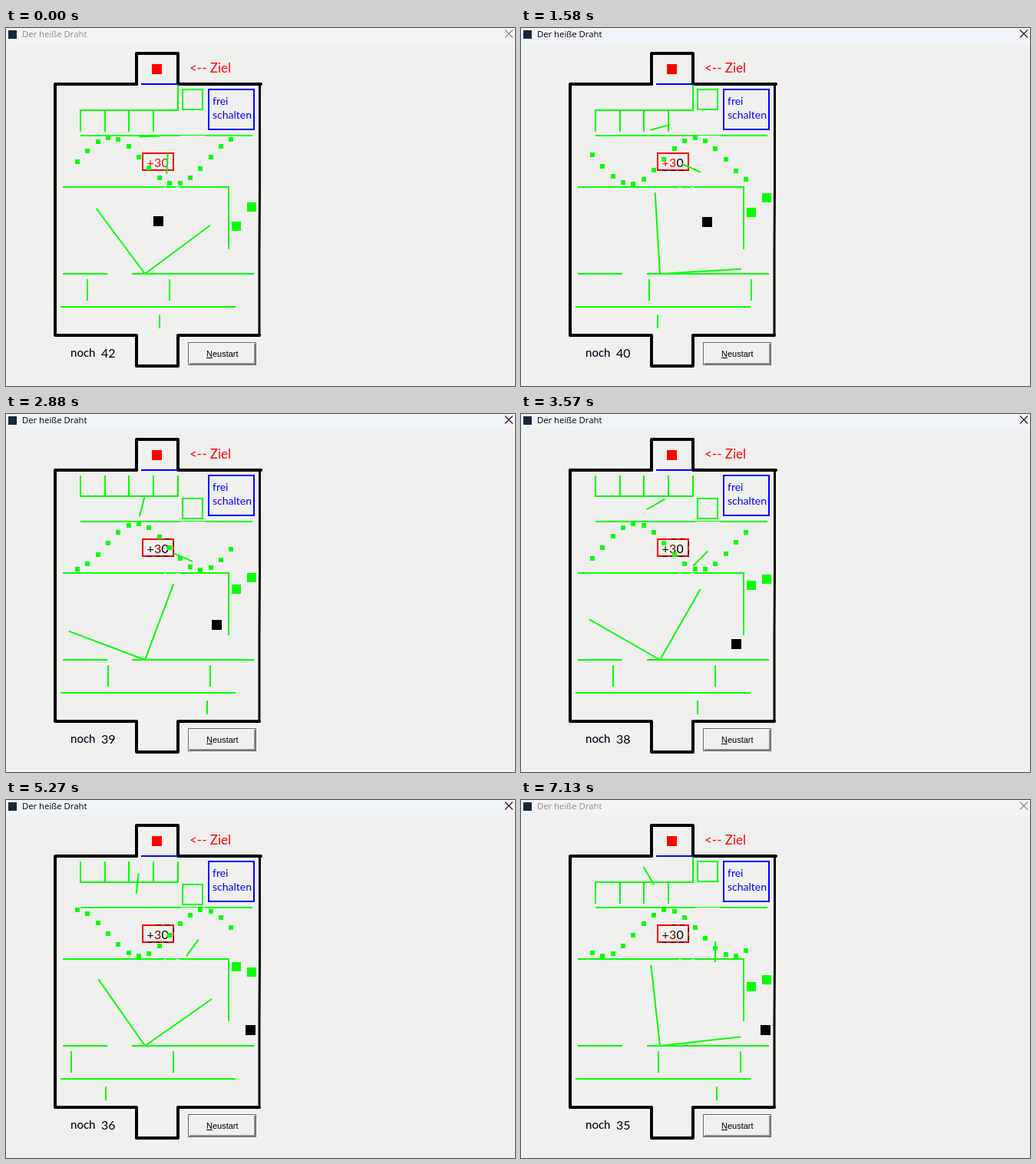
Animation of 663x466 px, one loop 7.18 s. Source, as an HTML page with a canvas:

```html
<!DOCTYPE html>
<html lang="de">
<head>
<meta charset="utf-8">
<title>Der heiße Draht</title>
<style>
  html, body { margin: 0; width: 100%; height: 100%; overflow: hidden; background: #f0f0ee; }
  canvas { display: block; width: 663px; height: 466px; }
</style>
</head>
<body>
<canvas id="stage" width="663" height="466"></canvas>
<script>
const ctx = document.getElementById('stage').getContext('2d');
const LOOP = 7180, STEPS = 105, STEP = LOOP / STEPS;
const GREEN = '#00ff00', RED = '#ff0000', BLUE = '#0000ff', BLACK = '#000000';
const HAND = 'Lato, "Open Sans", sans-serif';

// [screen refresh, game ticks]: the game clock runs unevenly
const TICKS = [[0, 0], [13, 16], [33, 42], [52, 58], [64, 67], [89, 92], [104, 105]];
// [screen refresh, x, y] of the player
const PATH = [[0, 198, 251], [5, 198, 251], [13, 216.5, 251], [33, 268.5, 253],
              [52, 280.5, 299], [64, 302.5, 299], [73, 318.5, 299]];

const mod = (v, m) => ((v % m) + m) % m;

function lerpKeys(keys, f, col) {
  for (let i = 1; i < keys.length; i++) {
    const a = keys[i - 1], b = keys[i];
    if (f <= b[0]) return a[col] + (b[col] - a[col]) * (f - a[0]) / (b[0] - a[0]);
  }
  return keys[keys.length - 1][col];
}

function line(color, width, ...pts) {
  ctx.strokeStyle = color;
  ctx.lineWidth = width;
  ctx.beginPath();
  for (let i = 0; i < pts.length; i += 2) ctx.lineTo(pts[i], pts[i + 1]);
  ctx.stroke();
}

function square(color, x, y, size) {
  ctx.fillStyle = color;
  ctx.fillRect(Math.round(x - size / 2), Math.round(y - size / 2), size, size);
}

function frame(color, x, y, w, h) {
  ctx.strokeStyle = color;
  ctx.lineWidth = 2;
  ctx.strokeRect(x, y, w, h);
}

function text(str, x, y, color, font) {
  ctx.fillStyle = color;
  ctx.font = font;
  ctx.fillText(str, x, y);
}

function stick(x, y, angle) {
  const dx = 13.5 * Math.cos(angle), dy = 13.5 * Math.sin(angle);
  line(GREEN, 2, x - dx, y + dy, x + dx, y - dy);
}

function titleBar(active) {
  ctx.fillStyle = active ? '#f0f3f8' : '#f3f3f3';
  ctx.fillRect(0, 0, 663, 20);
  square('#182838', 8, 8, 11);
  text('Der heiße Draht', 21, 12, active ? '#000' : '#8c8c8c', '11.3px "Open Sans", "Noto Sans", sans-serif');
  const x = active ? '#3a1820' : '#8c8c8c';
  line(x, 1.2, 650, 2.5, 660, 12.5);
  line(x, 1.2, 660, 2.5, 650, 12.5);
}

function walls() {
  ctx.lineJoin = 'round';
  ctx.lineCap = 'round';
  line(BLACK, 4, 170, 73, 64, 73, 64, 400, 170, 400, 170, 440, 224, 440, 224, 400, 330, 400);
  line(BLACK, 4, 170, 73, 170, 33, 224, 33, 224, 73, 332, 73);
  line(BLACK, 3, 330.5, 73, 330.5, 205, 330, 290, 330, 400);
  ctx.lineCap = 'butt';
  ctx.lineJoin = 'miter';
  line(BLUE, 2, 176, 73, 224, 73);
  square(RED, 196.5, 53.5, 13);
  text('<-- Ziel', 239, 58, RED, '17px ' + HAND);
  frame(BLUE, 264, 80, 59, 52);
  text('frei', 269, 100, BLUE, '14px ' + HAND);
  text('schalten', 269, 118, BLUE, '14px ' + HAND);
}

function fixedWires() {
  line(GREEN, 2, 97, 140, 227, 140);
  line(GREEN, 1, 227, 139.5, 260, 139.5);
  line(GREEN, 2, 260, 140, 321, 140);
  line(GREEN, 2, 74, 207, 291, 207, 291, 207);
  line('#f0f0ee', 1, 206, 207.5, 208, 207.5);
  line('#f0f0ee', 1, 221, 207.5, 226, 207.5);
  line(GREEN, 2, 290, 206, 290, 288);
  line(GREEN, 2, 74, 320, 132, 320);
  line(GREEN, 2, 164, 320, 323, 320);
  line(GREEN, 2, 71, 363, 299, 363);
}

function comb(up) {
  line(GREEN, 2, 96, 107, 225, 107);
  for (const x of [97, 129, 160, 192]) line(GREEN, 2, x, 107, x, up ? 80 : 135);
  line(GREEN, 2, 224, up ? 80 : 74, 224, 107);
  frame(GREEN, 230, up ? 110 : 80, 26, 26);
}

// The bonus loses its red where wires have swept over it
function bonus(f) {
  frame(RED, 178, 163, 40, 22);
  if (f >= 8) {
    ctx.setLineDash([6, 5]);
    line(BLACK, 1, 184, 185.5, 219, 185.5);
    if (f >= 25) {
      line(BLACK, 1, 218.5, 166, 218.5, 186);
      line(BLACK, 1, 196, 162.5, 218, 162.5);
    }
    ctx.setLineDash([]);
  }
  const font = '16px ' + HAND;
  text('+', 183.5, 181, f >= 25 ? '#200' : RED, font);
  text('3', 193, 181, f >= 25 ? '#800000' : RED, font);
  text('0', 202.5, 181, f >= 8 ? BLACK : RED, font);
}

function button() {
  ctx.fillStyle = '#646464';
  ctx.fillRect(237, 409, 89, 30);
  ctx.fillStyle = '#fff';
  ctx.fillRect(238, 410, 87, 28);
  ctx.fillStyle = '#8a8a8a';
  ctx.fillRect(239, 411, 86, 27);
  ctx.fillStyle = '#f0f0f0';
  ctx.fillRect(239, 411, 84, 25);
  text('Neustart', 261, 428, BLACK, '11px "Liberation Sans", Arial, sans-serif');
  line(BLACK, 1, 261, 429.5, 269, 429.5);
}

function movers(n) {
  const phase = 0.1 * n - 0.04;
  for (let i = 0; i < 16; i++)
    square(GREEN, 93 + i * 13.35, 173 - 30 * Math.sin(phase + i / 2), 6);

  stick(210 + 0.41 * n, 176.5 + 0.2 * n, 1.51 + 0.15 * n);
  stick(187 - 0.197 * n, 141 - 0.404 * n, 0.035 - 0.1 * n);

  const turn = mod(0.64 - 0.02 * n, Math.PI / 2);
  for (const a of [turn, turn + Math.PI / 2])
    line(GREEN, 2, 181, 320, 181 + 106 * Math.cos(a), 320 - 106 * Math.sin(a));

  for (const start of [106, 213]) {
    const x = Math.round(77.5 + mod(start - 77.5 - 1.595 * n, 240));
    line(GREEN, 2, x, 327, x, 355);
  }
  const x = Math.round(197 - 67 * Math.sin(phase));
  line(GREEN, 2, x, 373, x, 391);

  square(GREEN, 300, n < 75 ? 258 - 0.61 * n : 212.2 + 1.03 * (n - 75), 12);
  square(GREEN, 320, 212.2 + 0.41 * Math.abs(n - 51), 12);
}

function draw(now) {
  const t = now % LOOP;
  const f = Math.min(STEPS - 1, Math.floor((t + 10) / STEP));
  const ms = f * STEP;
  const n = Math.round(lerpKeys(TICKS, f, 1));

  ctx.fillStyle = '#f0f0ee';
  ctx.fillRect(0, 0, 663, 466);
  titleBar(f >= 5 && f < 102);
  walls();
  bonus(f);
  fixedWires();
  comb(Math.floor((ms - 150) / 403) % 2 === 0 && ms >= 150);
  movers(n);
  square(BLACK, lerpKeys(PATH, f, 1), lerpKeys(PATH, f, 2), 13);
  text('noch', 84, 428, '#000818', '500 15px ' + HAND);
  text(String(42 - Math.floor((ms + 800) / 1000)), 124, 429, BLACK, '16px ' + HAND);
  button();
}

const start = performance.now();
function loop() {
  draw(performance.now() - start);
  requestAnimationFrame(loop);
}
loop();
</script>
</body>
</html>
```
